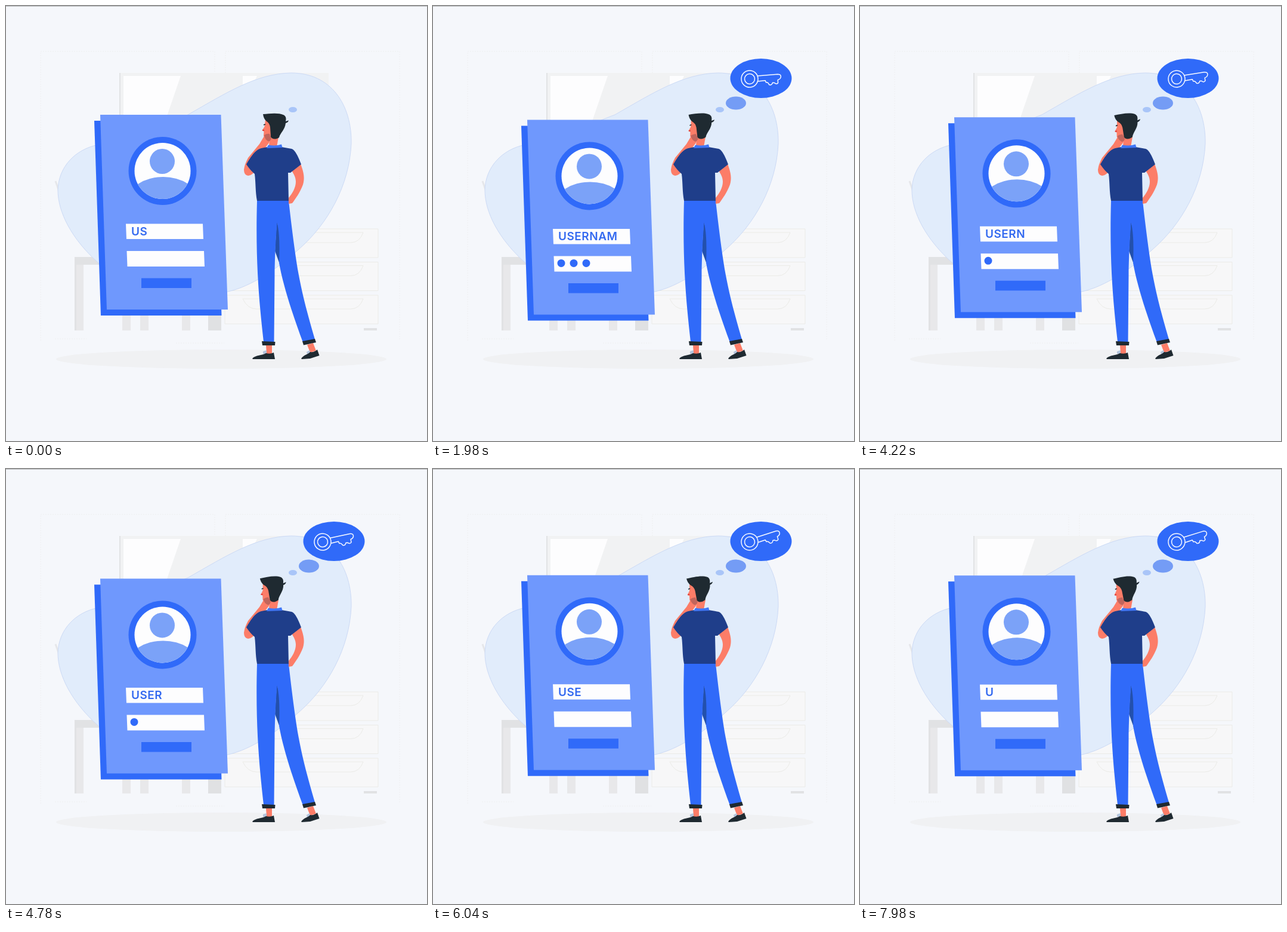
An HTML page for the animation above (8 s loop, 706 px wide and 728 px high).

```html
<!DOCTYPE html>
<html lang="en">
<head>
<meta charset="utf-8">
<title>Forgotten login</title>
<style>
  html, body { margin: 0; width: 100%; height: 100%; overflow: hidden; background: #f5f7fb; }
  svg { display: block; width: 100%; height: 100%; }
  text { font: 600 19px Inter, "Open Sans", sans-serif; letter-spacing: .5px; fill: #346af0; }
  .blue { fill: #306af9; }
  .skin { fill: #fc7d68; }
  .dark { fill: #1f2a31; }
  .paper { fill: #fdfdfe; }
  .avatar { fill: #7ba2f8; }
  .faint { fill: none; stroke: #eeeff0; }
  .drawer { fill: #f7f7f8; stroke: #ebebe7; }
  .key { fill: none; stroke: #f8faff; stroke-width: 1.5; stroke-linejoin: round; }
</style>
</head>
<body>
<svg viewBox="0 0 706 728">
  <defs>
    <clipPath id="portrait"><circle cx="262.5" cy="276" r="47"/></clipPath>
    <g id="drawer" class="drawer">
      <path d="M367 373H624V421H367Z"/>
      <path d="M397 379H599Q593 396 578 396H420Q405 396 397 379Z"/>
    </g>
  </defs>

  <rect width="706" height="728" fill="#f5f7fb"/>
  <rect width="706" height="1" fill="#b8b9bc"/>

  <!-- room -->
  <g class="faint" stroke-dasharray="2 2">
    <path d="M58 560V76H350V112M368 112V76H660V560M82 557H135M285 564H366"/>
  </g>
  <path d="M190 112H541V300H190Z" fill="#f1f2f3"/>
  <path d="M191 112V300" stroke="#e2e3e5" stroke-width="2"/>
  <path class="paper" d="M197 117H293L230 300H197ZM397 117H421L400 160H397Z"/>
  <path d="M83 293L89 310" stroke="#e6e7ea" stroke-width="3"/>
  <use href="#drawer"/>
  <use href="#drawer" y="55.5"/>
  <use href="#drawer" y="111"/>
  <path d="M600 541H622" stroke="#e1e2e4" stroke-width="4"/>
  <path d="M115 420H361V433H130V543H115Z" fill="#e1e2e4"/>
  <path d="M118 433H130V543H118ZM195 433H209V543H195ZM225 433H239V543H225ZM295 433H309V543H295Z" fill="#e8e8ea"/>
  <path d="M339 433H361V543H339Z" fill="#e0e1e3"/>
  <ellipse cx="361" cy="591" rx="277" ry="16" fill="#f0f1f3"/>
  <path fill="#e1ecfb" stroke="#ccdaf5" d="M478 112C545 112 580 165 579 230C576 300 540 365 490 408C455 440 410 470 372 478C300 490 200 470 155 430C110 390 87 345 87 308C88 270 115 240 155 232C230 215 270 195 305 182C370 145 420 113 478 112Z"/>

  <!-- login card -->
  <g id="card">
    <path class="blue" d="M148 192H351L361.500 518H159Z"/>
    <path fill="#6f98fd" d="M158 182H360.5L372 508H169Z"/>
    <circle class="blue" cx="262.5" cy="276" r="57"/>
    <circle class="paper" cx="262.5" cy="276" r="47"/>
    <circle class="avatar" cx="262" cy="260" r="21"/>
    <ellipse class="avatar" cx="263.5" cy="324" rx="58" ry="38" clip-path="url(#portrait)"/>
    <path class="paper" d="M201 364.5H330L331 390H202ZM202.500 410H332L333 436H203.500Z"/>
    <path class="blue" d="M227 455.500H311V472H227Z"/>
    <text id="name" x="210" y="384"></text>
    <g id="dots" class="blue"></g>
  </g>

  <!-- thought -->
  <ellipse cx="481" cy="173.500" rx="7" ry="4.500" fill="#a9c5f8"/>
  <g id="midBubble"><ellipse rx="17" ry="11" fill="#749cf5"/></g>
  <g id="bigBubble">
    <ellipse class="blue" rx="51.500" ry="33"/>
    <g id="key" class="key">
      <circle r="14"/><circle r="8.500"/>
      <path d="M13.500 -4L47 -4.500Q53 -4 52.500 0Q52 4 47 5L47 10Q44 13 41 9.500L38 9Q36 14 32 12Q30 7 27 8L26 4.500L13.500 5"/>
    </g>
  </g>

  <!-- man -->
  <path class="skin" d="M436 568H446V582H437ZM505 567L515 564L520 577L510 580Z"/>
  <path fill="#b4c4dc" d="M431 578L437 576V582H431ZM504 579L509 576L511 581L505 584Z"/>
  <path class="dark" d="M413 590C418 584 430 585 436 581Q443 583 449 580L451 591H414ZM495 590C500 583 507 583 510 579Q517 580 522 575L525.500 585L510 590L496 591Z"/>
  <path fill="#2350ac" d="M454 360L460 380L459 432L451 410Z"/>
  <path class="blue" d="M421 326H474C479 370 484 410 489 440C498 490 509 527 518 558L498 563C480 515 464 465 458 430C459 405 459 380 454.500 362C453 385 451 410 450.500 450L449.500 562H432C425 500 418 430 421 326Z"/>
  <path class="dark" d="M429 561L451.500 562L451 568H430ZM497 561L518 557L520 563L499 567.500Z"/>
  <path class="skin" d="M434 216L425 231L406 254Q400 265 399 274Q399 283 406 284Q413 283 418 276L428 246L441 229L443 219Z"/>
  <path class="skin" d="M494 264C500 280 501 289 498 299C493 312 486 322 480 330L474 331V321C480 314 486 304 486 294C486 286 482 281 479 275Z"/>
  <path class="skin" d="M442 216L457 219L454 236H441Z"/>
  <path fill="#1f3e8a" d="M428 238C417 241 409 255 403 265C408 272 412 277 417 281C419 297 418 310 421 326H474L473 279H477L495 265C490 252 485 241 479 239L462 236H438Z"/>
  <path fill="#3f76f6" d="M437 238L440 232.500Q452 235 462 231.500L463.500 237Z"/>
  <g id="head">
    <path class="skin" d="M435 190L433.500 202L429.500 208L432.500 210L432 217Q434 226 441 226L447 214L444 194Z"/>
    <path fill="#c2655c" d="M433 216Q438 213 442 214L445 222Q442 228 439 226Q434 223 433 216Z"/>
    <path d="M432 199L435 198" stroke="#1f2a31" stroke-width="1.500"/>
    <path d="M430 208H433" stroke="#e0403c" stroke-width="2"/>
    <path class="dark" d="M431 181C442 180 457 178 466 182.500C470 185 470 189 469 193L474 191.500Q473 195 469 196C468 207 460 212 458 220C452 224 446 223 444 219L443 203Q442 196 437 193Q432 189 431 181Z"/>
    <ellipse class="skin" cx="438.500" cy="206" rx="4" ry="5.500"/>
  </g>
</svg>

<script>
const LOOP = 8000;
const LABEL = "USERNAME";
const $ = id => document.getElementById(id);
const clamp = (v, lo, hi) => Math.min(hi, Math.max(lo, v));

const dots = Array.from({ length: 5 }, (_, i) => {
  const dot = document.createElementNS("http://www.w3.org/2000/svg", "circle");
  dot.setAttribute("cx", 215 + 21 * i);
  dot.setAttribute("cy", 422);
  dot.setAttribute("r", 6.5);
  return $("dots").appendChild(dot);
});

function transform(id, value) { $(id).setAttribute("transform", value); }

function pop(id, x, y, start, t) {
  const p = clamp((t - start) / 260, 0, 1);
  transform(id, `translate(${x} ${y}) scale(${1 - (1 - p) ** 3})`);
}

function draw(t) {
  const wave = Math.sin((t - 330) * 2 * Math.PI / 8800);
  transform("card", `translate(0 ${1.7 + 7.3 * wave})`);
  transform("key", `translate(-19 1) rotate(${-11 + 7.5 * wave})`);
  transform("head", `rotate(${-7.5 * Math.sin(t / 8200 * Math.PI / 2)} 449 232)`);

  // quick typing, then slow deletion
  const erased = (t - 3060) * 0.00105;
  const letters = Math.min(2.3 + t * 0.0036, 6.3 - erased);
  const marks = Math.min((t - 1150) * 0.0042, 2.9 - erased);
  $("name").textContent = LABEL.slice(0, Math.floor(clamp(letters, 0, LABEL.length)));
  dots.forEach((dot, i) => dot.setAttribute("visibility", marks >= i + 1 ? "visible" : "hidden"));

  pop("midBubble", 508, 162.5, 400, t);
  pop("bigBubble", 550, 121, 1200, t);
}

const begin = performance.now();
function tick() {
  draw((performance.now() - begin) % LOOP);
  requestAnimationFrame(tick);
}
tick();
</script>
</body>
</html>
```
